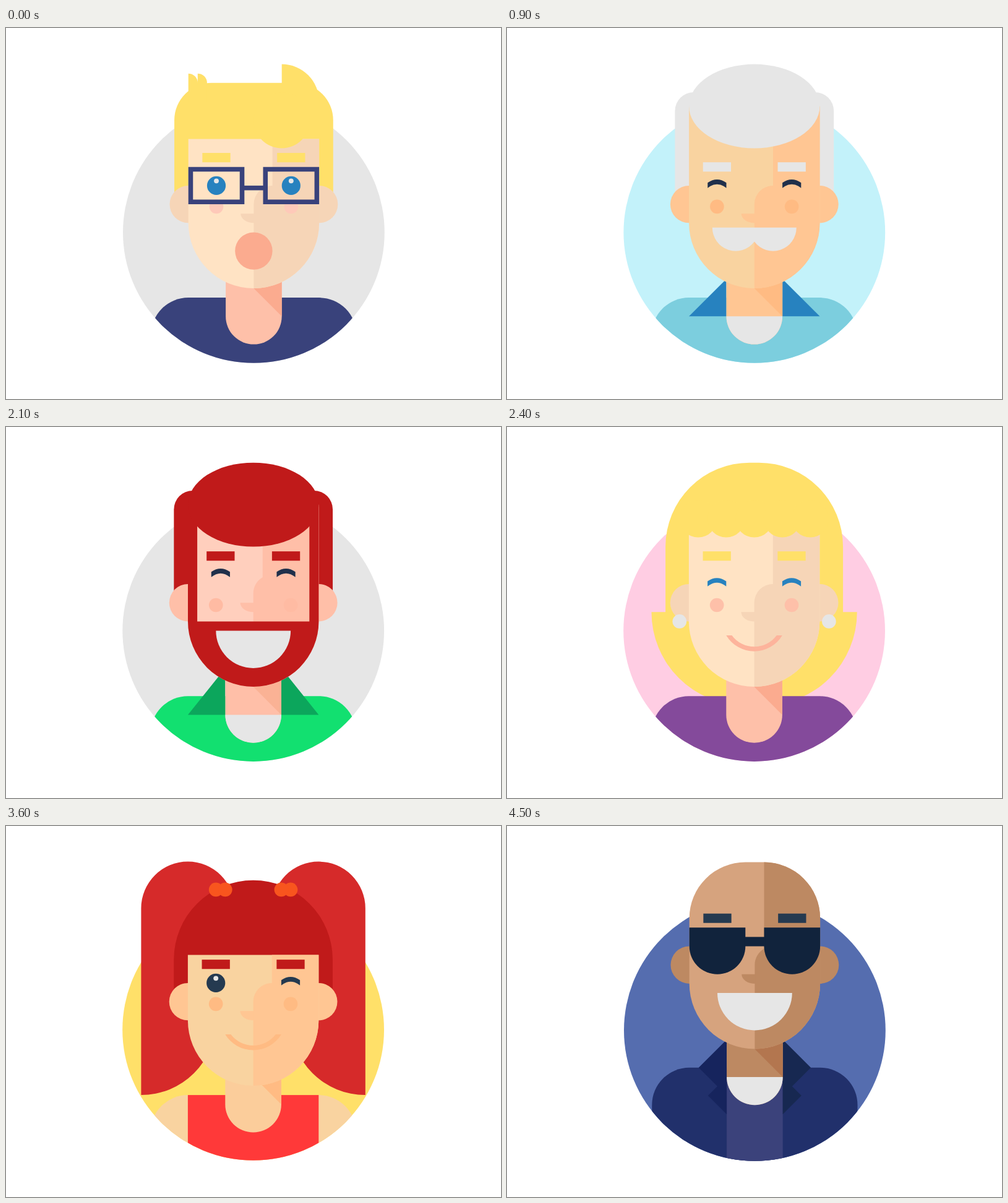
Write an HTML page that moves like this. It is 800x600 px and loops after 4.8 s.

```html
<!DOCTYPE html>
<html lang="en">
<head>
<meta charset="utf-8">
<title>Portraits</title>
<style>
  html, body { margin: 0; width: 100%; height: 100%; overflow: hidden; background: #fff; }
  svg { display: block; width: 100vw; height: 100vh; }
  .portrait { visibility: hidden; }
</style>
</head>
<body>
<svg id="stage" viewBox="0 0 800 600"></svg>
<script>
// All portraits sit on a grid of 15.1 px units, centred on the backdrop circle.
const UNIT = 15.1;
const GREY = '#e6e6e6', NAVY = '#253a50', BLUE = '#2782bf', YELLOW = '#ffe069', CRIMSON = '#c01a1a';
const PALE = { light: '#ffe3c4', dark: '#f6d5b7', neck: '#fec0a9', shadow: '#fbab8f' };
const TAN = { light: '#f9d3a0', dark: '#ffc693', neck: '#ffc693', shadow: '#ffbb83' };
const OLIVE = { ...TAN, light: '#fcd4a0', shadow: '#fab277' };
const ROSY = { light: '#ffcfbd', dark: '#ffbfa8', neck: '#ffbfa8', shadow: '#fab295' };
const BROWN = { light: '#d6a37e', dark: '#bd8962', neck: '#bd8962', shadow: '#b3764f' };

const path = (d, fill) => `<path d="${d}" fill="${fill}" fill-rule="evenodd"/>`;
const circle = (x, y, r, fill) => `<circle cx="${x}" cy="${y}" r="${r}" fill="${fill}"/>`;
const rect = (x, y, w, h, fill) => `<rect x="${x}" y="${y}" width="${w}" height="${h}" fill="${fill}"/>`;
const pair = draw => draw(-1) + draw(1);
const inDisc = content => `<g clip-path="url(#disc)">${content}</g>`;

const backdrop = fill => circle(0, 0, 14, fill);
const shoulders = (fill, top = 7) =>
  inDisc(path(`M-11 15V${top + 4}a4 4 0 0 1 4 -4H7a4 4 0 0 1 4 4V15Z`, fill));
const collar = (fill, top) => pair(s => path(`M${7 * s} 9H${3 * s}V${top}Z`, fill));

function neck(skin, bottom = 12, shirt) {
  const y = bottom - 3;
  return path(`M-3 ${y - 7}V${y}a3 3 0 0 0 6 0V${y - 7}Z`, skin.neck) +
    path(`M-3 ${y - 6}L3 ${y}V${y - 6}Z`, skin.shadow) +
    (shirt ? path(`M-3 ${y}a3 3 0 0 0 6 0Z`, shirt) : '');
}

const ears = (skin, y = -3) => pair(s => circle(7 * s, y, 2, skin.dark));

// bridge: centre height of the nose curve; split: where the shaded side begins
function face(skin, { top, chin = 6, bridge = -3, split = 2, round = 0 }) {
  const jaw = chin - 7;
  const brow = bridge - Math.sqrt(4 - (2 - split) ** 2);
  const right = `H${7 - round}a${round} ${round} 0 0 1 ${round} ${round}V${jaw}A7 7 0 0 1 0 ${chin}`;
  return path(`M${round - 7} ${top}${right}A7 7 0 0 1 -7 ${jaw}V${top + round}` +
      `a${round} ${round} 0 0 1 ${round} ${-round}Z`, skin.light) +
    path(`M${split} ${top}${right}V${bridge}A2 2 0 0 1 ${split} ${brow}Z`, skin.dark) +
    path(`M-1.4 ${bridge + 1}H0.05v1A1.4 1 0 0 1 -1.4 ${bridge + 1}Z`, skin.dark);
}

const brows = (y, fill, x = 4) => pair(s => rect(s * x - 1.5, y, 3, 1, fill));
const openEye = (x, y, fill) => circle(x, y, 1, fill) + circle(x, y - 0.5, 0.26, GREY);
const shutEye = (x, y, fill) =>
  path(`M${x - 1} ${y - 0.3}q1 -.7 2 0v.55q-1 -.8 -2 0Z`, fill);
const cheeks = (y, fill) => pair(s => circle(4 * s, y, 0.75, fill));
const grin = y => path(`M-4 ${y}a4 4 0 0 0 8 0Z`, GREY);
const smile = fill => path('M-3 .5A3.5 3.5 0 0 0 3 .5H2.4A3 3 0 0 1 -2.4 .5Z', fill);
const cap = (top, r, fill, half = 8.5, bottom = -3) =>
  path(`M${-half} ${bottom}V${top + r}a${r} ${r} 0 0 1 ${r} ${-r}H${half - r}` +
    `a${r} ${r} 0 0 1 ${r} ${r}V${bottom}Z`, fill);
const crown = fill => `<ellipse cy="-13.5" rx="7" ry="4.5" fill="${fill}"/>`;

const portraits = {
  surprised: { shift: [0, 0], art: () =>
    backdrop(GREY) + shoulders('#39427b') + neck(PALE) +
    cap(-16, 4, YELLOW) +
    path('M3 -18a4 4 0 0 1 4 4H3Z', YELLOW) +
    path('M-7 -14V-17a1 1 0 0 1 1 1V-17a1 1 0 0 1 1 1V-14Z', YELLOW) +
    ears(PALE) + face(PALE, { top: -10 }) + circle(3, -12, 3, YELLOW) +
    brows(-8.5, YELLOW) + cheeks(-2.75, '#fec9b9') +
    pair(s => openEye(4 * s, -5, BLUE) +
      path(`M${4 * s - 3} -7h6v4h-6Zm.5 .5v3h5v-3Z`, '#39427b')) +
    rect(-1.1, -5, 2.2, 0.5, '#39427b') + circle(0, 2, 2, PALE.shadow) },

  grandpa: { shift: [-0.6, 0], art: () =>
    backdrop('#c3f2fa') + shoulders('#7ccede') + collar(BLUE, 5) + neck(TAN, 12, GREY) +
    cap(-15, 2, GREY) + ears(TAN) + face(TAN, { top: -13.5 }) + crown(GREY) +
    brows(-7.5, GREY) + pair(s => shutEye(4 * s, -5, '#20304b')) +
    cheeks(-2.75, TAN.shadow) +
    path('M-4.5 -.5H4.5A2.5 2.5 0 0 1 0 1A2.5 2.5 0 0 1 -4.5 -.5Z', GREY) },

  cheerful: { shift: [-0.7, -0.4], art: () => {
    const hair = '#7a3131';
    return backdrop('#7ad6ab') + shoulders('#ffd045') + collar(YELLOW, 4) +
      neck(OLIVE, 12, GREY) + cap(-13, 0, hair) + ears(OLIVE, -4) +
      face(OLIVE, { top: -12, chin: 5, bridge: -4 }) +
      pair(s => circle(3.5 * s, -13, 5, hair)).replace(/<circle/g, '<circle clip-path="url(#upper)"') +
      rect(-8.5, -13.1, 13.5, 2.1, hair) + rect(4, -13.1, 4.5, 1.1, hair) +
      circle(1, -16, 2, hair) + circle(-3, -14, 5, hair) + circle(5, -12, 2, hair) +
      path('M-9 -15H-7.5V-12.6H-8.5Q-9 -13.1 -9 -14H-8.7Q-9 -14.4 -9 -15Z', hair) +
      brows(-8.5, '#55333b') + pair(s => openEye(4 * s, -6, NAVY)) +
      cheeks(-3.75, '#ffbb83') + grin(-1);
  } },

  earrings: { shift: [-0.8, -0.9], art: () =>
    backdrop('#ffcde3') +
    path('M-11 -2H11A10 10 0 0 1 1 8H-1A10 10 0 0 1 -11 -2Z', YELLOW) +
    cap(-18, 9, YELLOW, 9.5, -1.9) + shoulders('#844a9b') + neck(PALE) +
    ears(PALE) + pair(s => circle(8 * s, -1, 0.75, GREY)) +
    face(PALE, { top: -12 }) +
    [-6, -3, 0, 3, 6].map(x => circle(x, -12, 2, YELLOW)).join('') +
    brows(-8.5, YELLOW) + pair(s => shutEye(4 * s, -5, BLUE)) +
    cheeks(-2.75, PALE.neck) + smile('#fdb49c') },

  bearded: { shift: [-0.7, -0.9], art: () =>
    backdrop(GREY) + shoulders('#12e070') + collar('#0ca65c', 4) + neck(ROSY, 12, GREY) +
    cap(-15, 2, CRIMSON) + ears(ROSY) +
    face(ROSY, { top: -13.5, bridge: -4, split: 1 }) +
    cheeks(-2.75, '#ffbba3') +
    path('M-7 -13.5H7V-1A7 7 0 0 1 -7 -1ZM-6 -13V-1H6V-13Z', CRIMSON) + crown(CRIMSON) +
    brows(-8.5, CRIMSON, 3.5) + pair(s => shutEye(3.5 * s, -6, '#20304b')) + grin(0) },

  pigtails: { shift: [-0.8, -1], art: () =>
    backdrop(YELLOW) +
    pair(s => `<g transform="scale(${s} 1)">` +
      path('M12 7V-13A5 5 0 0 0 2 -13V-1H4A8 8 0 0 0 12 7Z', '#d62a2a') + '</g>') +
    shoulders(TAN.light) + inDisc(rect(-7, 7, 14, 8, '#ff3939')) +
    neck({ ...TAN, neck: '#fbcd9b' }, 11) +
    cap(-16, 8.5, CRIMSON) + ears(TAN) + face(TAN, { top: -8 }) +
    pair(s => circle(4 * s, -15, 0.75, '#f8551e') + circle(3 * s, -15, 0.75, '#f8551e')) +
    brows(-7.5, CRIMSON) + openEye(-4, -5, NAVY) + shutEye(4, -5, NAVY) +
    cheeks(-2.75, TAN.shadow) + smile(TAN.shadow) },

  shades: { shift: [0, 0], art: () => {
    const lens = '#11233c';
    return backdrop('#556daf') + shoulders('#21306b', 4) +
      inDisc(rect(-3, 4, 6, 11, '#3b427b')) +
      pair(s => path(`M${3 * s} 1L${6 * s} 4L${4 * s} 6L${5 * s} 7L${3 * s} 9Z`,
        s < 0 ? '#16245d' : '#172851')) +
      neck(BROWN, 8, GREY) + ears(BROWN, -7) +
      face(BROWN, { top: -18, chin: 2, bridge: -7, split: 1, round: 6 }) +
      brows(-12.5, NAVY) +
      pair(s => path(`M${4 * s - 3} -11h6v2a3 3 0 0 1 -6 0Z`, lens)) +
      rect(-1.1, -10, 2.2, 1, lens) + grin(-4);
  } }
};

const SLOT = 300;
const order = ['surprised', 'cheerful', 'bearded', 'grandpa', 'pigtails', 'cheerful', 'surprised', 'bearded',
  'earrings', 'grandpa', 'bearded', 'earrings', 'pigtails', 'surprised', 'cheerful', 'shades'];

const stage = document.getElementById('stage');
stage.innerHTML = '<defs><clipPath id="disc"><circle r="14"/></clipPath>' +
  '<clipPath id="upper"><rect x="-9" y="-19" width="18" height="6"/></clipPath></defs>' +
  Object.entries(portraits).map(([name, { shift: [dx, dy], art }]) =>
    `<g class="portrait" id="${name}" transform="translate(${400.4 + dx} ${330.4 + dy}) scale(${UNIT})">${art()}</g>`
  ).join('');

const groups = [...stage.querySelectorAll('.portrait')];
const start = performance.now();

function show(now) {
  const slot = Math.floor(Math.max(0, now - start) / SLOT) % order.length;
  for (const g of groups) g.style.visibility = g.id === order[slot] ? 'visible' : 'hidden';
  requestAnimationFrame(show);
}
show(start);
</script>
</body>
</html>
```
